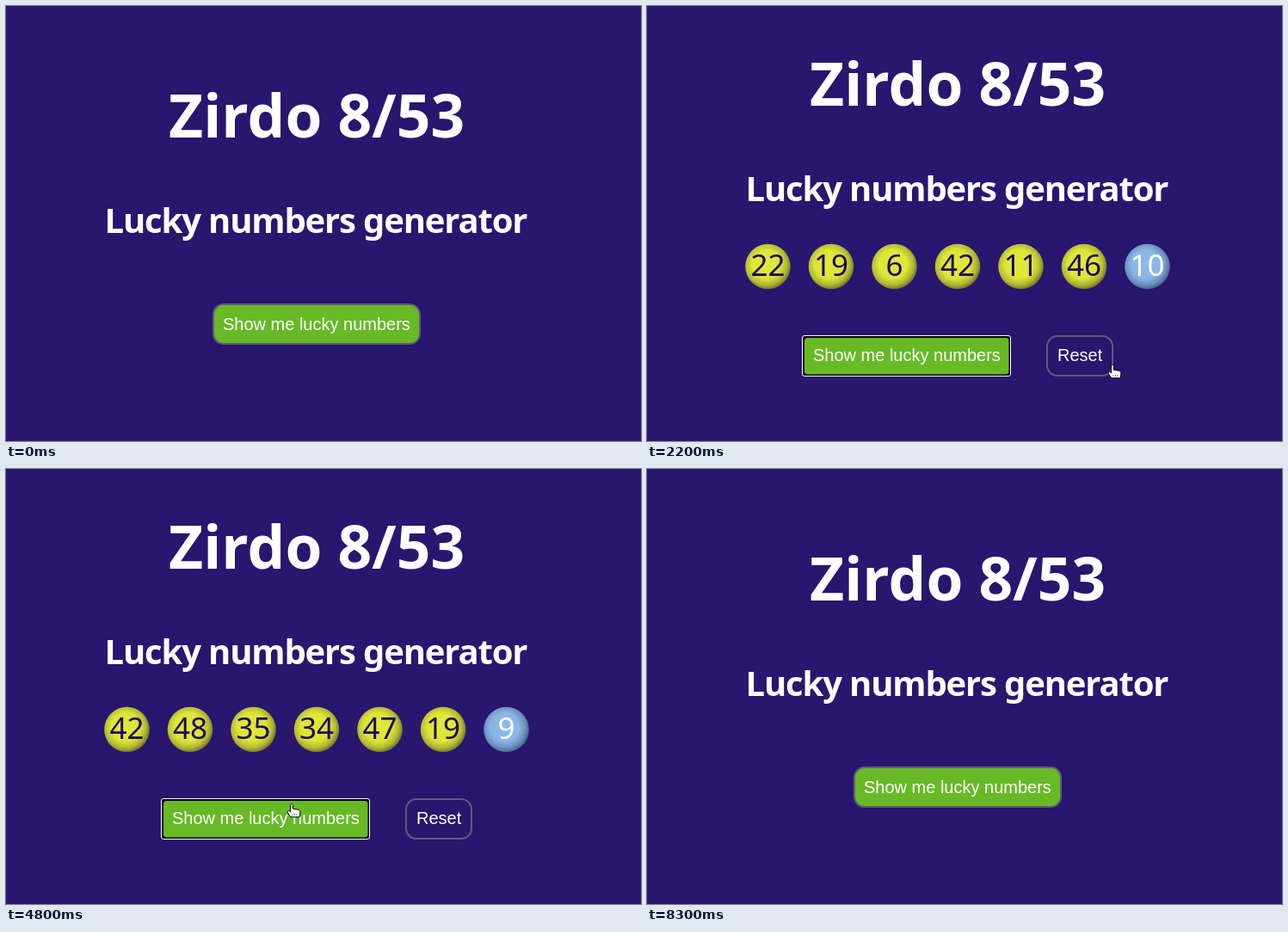
Write an HTML page that moves like this. It is 738 px wide and 506 px high and loops after 8600 ms.

```html
<!DOCTYPE html>
<html lang="en">
<head>
<meta charset="utf-8">
<title>Lucky numbers generator</title>
<style>
  html, body { margin: 0; width: 100%; height: 100%; overflow: hidden; background: #28166f; }
  svg { display: block; width: 738px; height: 506px; }
  text { fill: #fff; }
  .head { font-family: "Noto Sans", "Open Sans", sans-serif; font-weight: 700; }
  .label { font: 20px "Liberation Sans", Arial, sans-serif; }
  .num { font: 35px "Noto Sans", "Open Sans", sans-serif; text-anchor: middle; fill: #1c0b60; }
  .num.bonus { fill: #fff; }
  .edge { stroke: #605b78; stroke-width: 2; }
  .pointer path { fill: #fff; stroke: #000; stroke-linejoin: round; }
  .pointer .marks { fill: none; stroke: #555; stroke-width: .8; }
</style>
</head>
<body>
<svg viewBox="0 0 738 506">
  <defs>
    <radialGradient id="yellow" cx=".46" cy=".45" r=".57">
      <stop offset="0" stop-color="#e2ea38"/>
      <stop offset=".55" stop-color="#dde536"/>
      <stop offset=".8" stop-color="#b3b934"/>
      <stop offset="1" stop-color="#696c2f"/>
    </radialGradient>
    <radialGradient id="blue" cx=".46" cy=".45" r=".57">
      <stop offset="0" stop-color="#8ebaec"/>
      <stop offset=".55" stop-color="#8ab5e6"/>
      <stop offset=".8" stop-color="#6e92be"/>
      <stop offset="1" stop-color="#445c86"/>
    </radialGradient>
  </defs>
  <rect width="738" height="506" fill="#28166f"/>
  <g id="heads" class="head">
    <text x="189" y="152.5" font-size="69.4">Zirdo 8/53</text>
    <text x="114.5" y="264" font-size="40" letter-spacing="-1.15">Lucky numbers generator</text>
  </g>
  <g id="start">
    <rect class="edge" x="241" y="347" width="240" height="46" rx="12" fill="#68b926"/>
    <text class="label" x="252" y="377">Show me lucky numbers</text>
  </g>
  <g id="drawn">
    <g id="balls"></g>
    <rect x="180.5" y="383.5" width="242" height="47" rx="2.5" fill="#000" stroke="#fff"/>
    <rect x="183" y="386" width="237.5" height="42.5" rx="4" fill="#68b926"/>
    <text class="label" x="193" y="413">Show me lucky numbers</text>
    <rect class="edge" x="465" y="384" width="76" height="46" rx="12" fill="none"/>
    <text class="label" x="477" y="413">Reset</text>
  </g>
  <g id="hand" class="pointer">
    <path d="M-1.4 2C-1.4 0 1.4 0 1.4 2V6.2L7.2 7.2C9.4 7.6 10 8.6 9.9 10L9.3 15.8H-1.3L-4.6 10.8C-5.2 9 -3.8 8 -2.5 9L-1.4 10Z"/>
    <path class="marks" d="M1 12v2M3.5 12v2M6 12v2"/>
  </g>
  <g id="arrow" class="pointer">
    <path d="M.5 .5V13.5L3.6 10.7L5.7 15.4L7.8 14.5L5.8 10H10Z"/>
  </g>
</svg>
<script>
const LOOP = 8600, STEP = 100, RESET = 7400, ENTER = 600, LEAVE = 8300;
const SVG = "http://www.w3.org/2000/svg";
const $ = id => document.getElementById(id);

function add(parent, tag, attrs) {
  const el = document.createElementNS(SVG, tag);
  for (const key in attrs) el.setAttribute(key, attrs[key]);
  return parent.appendChild(el);
}

// Seven different numbers from 1 to 49, each following from the one before.
function pick(seed) {
  const numbers = [seed];
  while (numbers.length < 7) numbers.push((numbers.at(-1) * 17 + 3) % 49 + 1);
  return numbers;
}

const draws = [
  { at: 1000, numbers: "22 19 6 42 11 46 10".split(" ") },
  { at: 3400, numbers: pick(45) },
  { at: 4500, numbers: "42 48 35 34 47 19 9".split(" ") }
];

// Each move runs from the last resting point; dip bows its path downwards.
const entry = [225, 436];
const moves = [
  { at: 600, steps: 3, to: [305, 382] },
  { at: 1600, steps: 5, to: [526, 425], dip: 30 },
  { at: 2200, steps: 1, to: [541, 417] },
  { at: 2400, steps: 2, to: [528, 416], dip: -4 },
  { at: 2700, steps: 5, to: [348, 399], dip: 6 },
  { at: 3700, steps: 1, to: [354, 402] },
  { at: 4600, steps: 3, to: [332, 389] },
  { at: 5200, steps: 7, to: [518, 413], dip: 30 },
  { at: 5900, steps: 2, to: [502, 410] },
  { at: RESET + 200, steps: 7, to: [14, 1], dip: 200 }
];

function pointerAt(t) {
  if (t < ENTER || t >= LEAVE) return null;
  const i = moves.findLastIndex(m => m.at <= t);
  const { at, steps, to, dip = 0 } = moves[i];
  const from = i ? moves[i - 1].to : entry;
  const u = Math.min((Math.floor((t - at) / STEP) + 1) / steps, 1);
  const [x, y] = from.map((v, k) => v + (to[k] - v) * u);
  return [x, y + dip * Math.sin(Math.PI * u)];
}

const inside = ([x, y], left, top, right, bottom) => x >= left && x <= right && y >= top && y <= bottom;

function overButton(tip, t, open) {
  if (open) return inside(tip, 180, 382, 423, 431) || inside(tip, 464, 383, 542, 431);
  // The hand stays until the pointer moves again after a reset.
  return (t >= RESET && t < RESET + 200) || inside(tip, 240, 346, 482, 394);
}

const labels = Array.from({ length: 7 }, (_, i) => {
  const x = 140.5 + 73.5 * i, bonus = i === 6;
  add($("balls"), "circle", { cx: x, cy: 303, r: 26.3, fill: bonus ? "url(#blue)" : "url(#yellow)" });
  return add($("balls"), "text", { class: bonus ? "num bonus" : "num", x, y: 313.5 });
});

const show = (id, on) => $(id).setAttribute("visibility", on ? "visible" : "hidden");

function render(t) {
  const draw = draws.findLast(d => d.at <= t);
  const open = Boolean(draw) && t < RESET;
  show("start", !open);
  show("drawn", open);
  $("heads").setAttribute("transform", `translate(0 ${open ? -37 : 0})`);
  if (open) labels.forEach((label, i) => { label.textContent = draw.numbers[i]; });

  const tip = pointerAt(t);
  const onButton = tip && overButton(tip, t, open);
  show("hand", onButton);
  show("arrow", tip && !onButton);
  if (tip) $(onButton ? "hand" : "arrow").setAttribute("transform", `translate(${tip.map(Math.round)})`);
}

const begin = performance.now();
function tick() {
  render((performance.now() - begin) % LOOP);
  requestAnimationFrame(tick);
}
tick();
</script>
</body>
</html>
```
